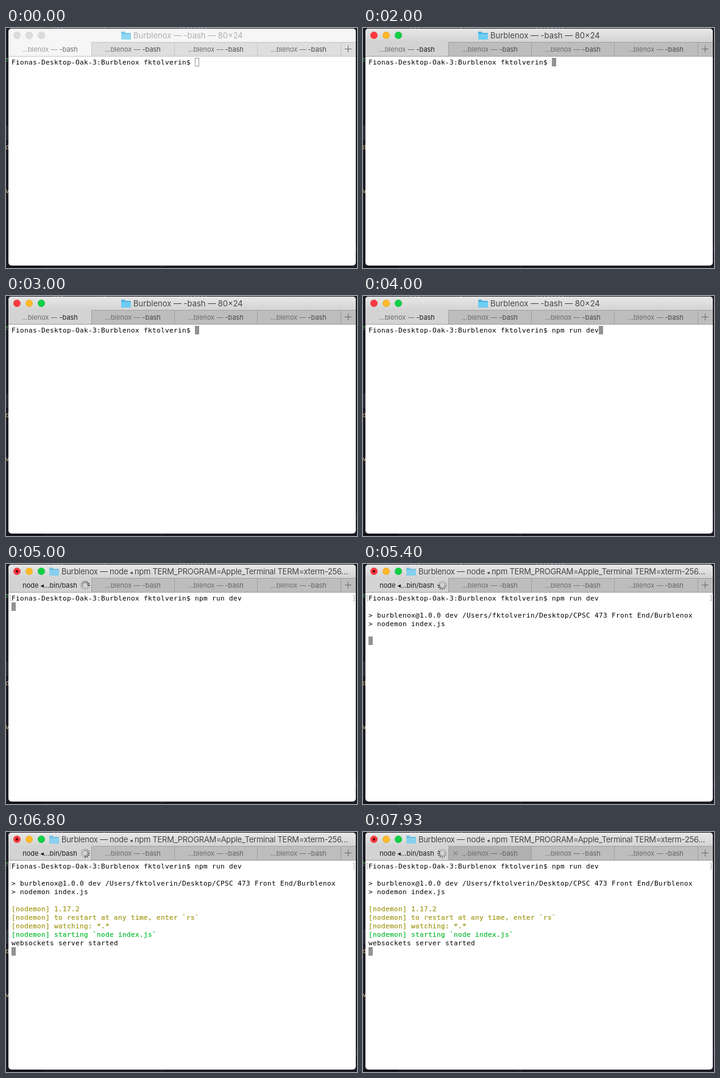
These frames come from a looping animation (576 by 394 pixels, 8000 ms). An HTML page:

```html
<!DOCTYPE html>
<html lang="en">
<head>
<meta charset="utf-8">
<title>Terminal</title>
<style>
  html, body { margin: 0; width: 100%; height: 100%; overflow: hidden; background: #1c1c27; }
  svg { display: block; width: 576px; height: 394px; }
  text { white-space: pre; }
  .mono { font: 11px "DejaVu Sans Mono", monospace; letter-spacing: .378px; }
  .title { font: 13px Inter, "DejaVu Sans", sans-serif; fill: #454545; }
  .long { letter-spacing: -.29px; }
  .small { font-size: 9px; }
  .tab { font: 11px Inter, "DejaVu Sans", sans-serif; text-anchor: middle; fill: #6d6d6d; }
  .tab tspan { fill: #484848; }
  .tab.front tspan, .tab.run { fill: #1c1c1c; }
  .busy .tab tspan { fill: #626262; }
  .idle .title { fill: #b0b0b0; }
  .idle .front { fill: #999; }
  .idle .front tspan { fill: #6c6c6c; }
  .line { stroke: #a0a0a0; }
  .idle .line { stroke: #c6c6c6; }
  .yellow { fill: #a39a1c; stroke: #a39a1c; stroke-width: .25px; }
  .green { fill: #10bb34; stroke: #10bb34; stroke-width: .25px; }
  .cursor { fill: #929292; }
  .bracket { fill: none; stroke: #a8a8a8; }
</style>
</head>
<body>
<svg viewBox="0 0 576 394">
  <defs>
    <linearGradient id="bar" x2="0" y2="1">
      <stop stop-color="#e8e8e8"/><stop offset="1" stop-color="#d2d2d2"/>
    </linearGradient>
    <clipPath id="win"><rect x="4" y="1" width="570" height="389" rx="5"/></clipPath>
    <g id="folder">
      <path d="M0 2q0-1 1-1h4.500l1.500 2h8q1 0 1 1v9q0 1-1 1H1q-1 0-1-1z" fill="#4db5e2"/>
      <path d="M0 5h16v8q0 1-1 1H1q-1 0-1-1z" fill="#6ccdf3"/>
    </g>
  </defs>

  <!-- editor behind the window -->
  <rect width="576" height="394" fill="#1c1c27"/>
  <rect y="160" width="5" height="24" fill="#2b2d3a"/>
  <rect y="390" width="58" height="4" fill="#15151d"/>
  <path d="M78 .5h16m66 0h5m120 0h48" stroke="#66607a" stroke-dasharray="2 4"/>
  <path d="M254 391.500h6M575.500 358v10" stroke="#454860" stroke-dasharray="2 2"/>
  <g class="mono">
    <text x="-3" y="55" fill="#4fae62">e</text>
    <text x="-1" y="199" fill="#d3b083">d</text>
    <text x="-1" y="271" fill="#c9b783">v</text>
  </g>

  <g clip-path="url(#win)">
    <rect x="4" y="1" width="570" height="389" fill="#fff"/>
    <g id="idle" class="idle" data-show="0 2000"></g>
    <g id="live" data-show="2000 8000"></g>
    <g id="spin" data-show="4670 8000" fill="none" stroke="#1c1c1c" stroke-width="1.300"></g>

    <g class="mono">
      <text x="9" y="60">Fionas-Desktop-Oak-3:Burblenox fktolverin$ <tspan data-show="3400 8000">npm run dev</tspan></text>
      <g data-show="4670 8000" class="bracket">
        <path d="M8 51.500H6.500v9H8M569.500 51.500h2v9h-2"/>
      </g>
      <g data-show="5200 8000">
        <text x="9" y="88">&gt; burblenox@1.0.0 dev /Users/fktolverin/Desktop/CPSC 473 Front End/Burblenox</text>
        <text x="9" y="102">&gt; nodemon index.js</text>
      </g>
      <g data-show="5600 8000">
        <g class="yellow">
          <text x="9" y="130">[nodemon] 1.17.2</text>
          <text x="9" y="144">[nodemon] to restart at any time, enter `rs`</text>
          <text x="9" y="158">[nodemon] watching: *.*</text>
        </g>
        <text x="9" y="172" class="green">[nodemon] starting `node index.js`</text>
      </g>
      <text x="9" y="186" data-show="5870 8000">websockets server started</text>
    </g>
    <rect data-show="0 2000" x="310.500" y="49.500" width="6" height="13" fill="#fff" stroke="#999"/>
    <g id="cursors" class="cursor"></g>
  </g>
</svg>
<script>
const LOOP = 8000;
const SPIN = 800; // one turn of the spinner
const $ = id => document.getElementById(id);
const edges = [140, 276, 412, 549];

const circle = (x, fill, edge) =>
  `<circle cx="${x}" cy="12" r="5.700" fill="${fill}" stroke="${edge}" stroke-width=".6"/>`;
const label = (i, cls = '') =>
  `<text class="tab ${cls}" x="${72 + 136 * i}" y="39">...blenox — <tspan>-bash</tspan></text>`;
const backLabels = [1, 2, 3].map(i => label(i)).join('');

// Title bar and tab strip of one window state.
function chrome({ bar, front, back, lights, edge }) {
  return `<rect x="4" y="1" width="570" height="23" fill="${bar}"/>
    <rect x="4" y="24" width="570" height="22" fill="${back}"/>
    <rect x="4" y="23" width="136" height="23" fill="${front}"/>
    <path class="line" fill="none" d="M140 23.500H574M4 46.500H574${edges.map(x => `M${x + .5} 24v22`).join('')}"/>
    <path d="M556 34.500h11m-5.500-5.500v11" stroke="#696969"/>` +
    lights.map((c, i) => circle(18 + 20 * i, c, edge[i])).join('');
}

const shortTitle = '<text class="title" x="209" y="17">Burblenox — -bash — 80×24</text>';

$('idle').innerHTML = chrome({
  bar: '#f6f6f6', front: '#f6f6f6', back: '#dedede',
  lights: Array(3).fill('#dcdcdc'), edge: Array(3).fill('#c8c8c8')
}) + label(0, 'front') + backLabels + shortTitle +
  '<use href="#folder" x="189" y="5" opacity=".75"/>';

$('live').innerHTML = chrome({
  bar: 'url(#bar)', front: '#d3d3d3', back: '#bdbdbd',
  lights: ['#fc3a40', '#fdb92a', '#10d044'], edge: ['#e2343a', '#e5a526', '#12b83c']
}) + `<g data-show="2000 4670">${label(0, 'front')}${backLabels}${shortTitle}
    <use href="#folder" x="189" y="5"/></g>
  <g data-show="4670 8000" class="busy">
    <circle cx="18" cy="12" r="2.200" fill="#6b0503"/>
    <use href="#folder" x="71" y="5" opacity=".75"/>
    <text class="title long" x="91" y="17">Burblenox — node <tspan class="small">◂</tspan> npm TERM_PROGRAM=Apple_Terminal TERM=xterm-256…</text>
    <text class="tab run" x="72" y="39">node ◂...bin/bash</text>
    <g data-show="7530 8000">
      <rect x="141" y="24" width="135" height="22" fill="#b0b0b0"/>
      <path d="M148.500 31.500l6.500 6.500m0-6.500l-6.500 6.500" stroke="#666"/>
    </g>
    ${backLabels}
  </g>`;

$('cursors').innerHTML = [
  [2000, 3400, 310, 0], [3400, 4670, 387, 0], [4670, 5200, 9, 1],
  [5200, 5600, 9, 5], [5600, 5870, 9, 9], [5870, LOOP, 9, 10]
].map(([a, b, x, row]) =>
  `<rect data-show="${a} ${b}" x="${x}" y="${49 + 14 * row}" width="7" height="14"/>`).join('');

$('spin').innerHTML = Array.from({ length: 12 }, (_, i) =>
  `<path d="M130 31.200v-4" transform="rotate(${30 * i} 130 35)"/>`).join('');

const spokes = [...$('spin').children];
const timed = [...document.querySelectorAll('[data-show]')].map(el => {
  const [from, to] = el.dataset.show.split(' ').map(Number);
  return { el, from, to };
});

function draw(now) {
  const t = now % LOOP;
  for (const { el, from, to } of timed)
    el.style.display = t >= from && t < to ? '' : 'none';
  const head = Math.floor(t / SPIN * 12) % 12;
  spokes.forEach((s, i) => {
    const age = (head - i + 12) % 12;
    s.style.opacity = Math.max(.25, .95 - age * .09);
  });
}

const start = performance.now();
function tick() {
  draw(performance.now() - start);
  requestAnimationFrame(tick);
}
tick();
</script>
</body>
</html>
```
